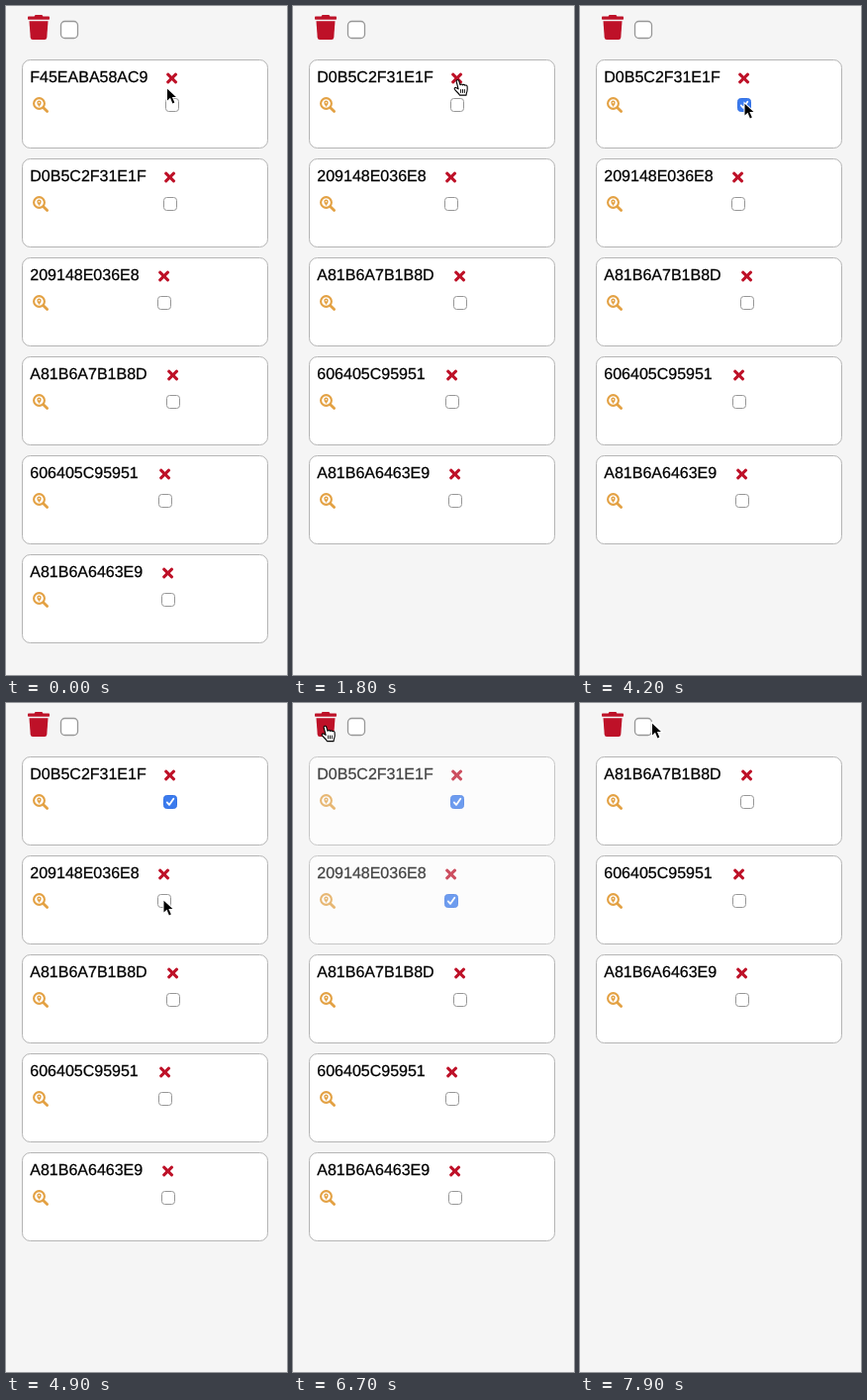
Write an HTML page that moves like this. It is 284 px wide and 676 px high and loops after 8000 ms.

```html
<!DOCTYPE html>
<html lang="en">
<head>
<meta charset="utf-8">
<title>Item list</title>
<style>
  html, body { margin: 0; width: 100%; height: 100%; overflow: hidden; background: #f5f5f5; }
  svg { display: block; }
  text { font: 16px "Liberation Sans", Arial, sans-serif; text-rendering: geometricPrecision; stroke: #000; stroke-width: .25; }
  .card { fill: #fff; stroke: #b5b5b5; }
  .box { fill: #fff; stroke: #979797; }
  .pressed .box { fill: #dcdcdc; stroke: #858585; }
  .checked .box { fill: #3b7bee; stroke: #3572e4; }
  .tick { fill: none; stroke: #fff; stroke-width: 1.8; stroke-linecap: round; stroke-linejoin: round; visibility: hidden; }
  .checked .tick { visibility: visible; }
  .red { fill: #be1128; }
</style>
</head>
<body>
<svg width="284" height="676" viewBox="0 0 284 676">
  <defs>
    <g id="lens" fill="none" stroke="#e3a143">
      <circle cx="6.5" cy="6.5" r="5.4" stroke-width="2.1"/>
      <path d="M11 11L14.6 14.6" stroke-width="2.8" stroke-linecap="round"/>
      <circle cx="6.5" cy="5.8" r="1.5" stroke-width="1.4"/>
      <path d="M4.6 7H8.4L6.5 10z" fill="#e3a143" stroke="none"/>
    </g>
    <g id="cross" class="red">
      <rect x="-6.9" y="-1.5" width="13.8" height="3" rx="1" transform="rotate(45)"/>
      <rect x="-6.9" y="-1.5" width="13.8" height="3" rx="1" transform="rotate(-45)"/>
    </g>
  </defs>
  <g class="red">
    <path d="M28.5 11L29.5 9H36.5L37.5 11z"/>
    <rect x="22" y="10.5" width="22" height="3.2" rx=".8"/>
    <path d="M23.5 15.2H42.5L41.3 31.8Q41.1 34 39 34H27Q24.9 34 24.7 31.8z"/>
  </g>
  <rect class="box" x="55.5" y="15.5" width="17" height="17" rx="4" stroke-width="1.3"/>
  <g id="list"></g>
  <path id="arrow" d="M1 2.2V14L4 11.2 6.4 16.9 8.3 16.1 5.9 10.6H9.9Z" stroke="#fff" stroke-width="2" paint-order="stroke"/>
  <g id="hand" fill="#fff" stroke="#000" stroke-width="1.1" stroke-linejoin="round" stroke-linecap="round">
    <path d="M5.1 10.4L3.2 3a1.3 1.3 0 0 1 2.5-.8L7 6.3c.3-1 2.2-1 2.4.1 .5-.9 2.2-.7 2.4.4 .6-.6 2.2-.3 2.3 1 .2 2 .3 3.4-.2 5 -.4 1.2-.8 2-.8 3.8H6.4c-.3-1.8-3.6-3.6-5-5.8 -.7-1.4.7-2.4 1.8-1.6z"/>
    <path d="M7.6 11v3M9.5 11v3M11.4 11v3" stroke-width=".9"/>
  </g>
</svg>
<script>
const LOOP = 8000, STEP = 100, PITCH = 100;

const items = [
  { label: 'F45EABA58AC9', x: 168, removed: 1500 },
  { label: 'D0B5C2F31E1F', x: 166, removed: 6700, pressed: 4000 },
  { label: '209148E036E8', x: 160, removed: 6700, pressed: 5100 },
  { label: 'A81B6A7B1B8D', x: 169 },
  { label: '606405C95951', x: 161 },
  { label: 'A81B6A6463E9', x: 164 }
];

// pointer moves: start time, end time, destination
const home = [162, 81.5];
const moves = [
  [0, 500, 161, 71],
  [1100, 1200, 162, 73.5],
  [2000, 2900, 165.5, 96.5],
  [4300, 4900, 158.5, 197.5],
  [5700, 6400, 28, 22],
  [7500, 7700, 72, 18.5]
];

const $ = id => document.getElementById(id);
const clamp = p => Math.min(1, Math.max(0, p));
const ease = p => p * p * (3 - 2 * p);

$('list').innerHTML = items.map(({ label, x }) => `<g>
  <rect class="card" x="16.5" y=".5" width="248" height="89" rx="8"/>
  <text x="24.3" y="23">${label}</text>
  <use href="#cross" x="${x - .4}" y="19"/>
  <use href="#lens" x="27" y="38"/>
  <g transform="translate(${x} 46)">
    <rect class="box" x="-6.5" y="-6.5" width="13" height="13" rx="3"/>
    <path class="tick" d="M-3.2 .4L-1 2.9 3.3 -3.2"/>
  </g></g>`).join('');
const cards = [...$('list').children];

function fade(age) {
  if (age < 0) return 1;
  return age < 300 ? .5 + .5 * Math.cos(Math.PI * (age + 140) / 400) : 0;
}

function pointerAt(t) {
  let [x, y] = home;
  for (const [start, end, toX, toY] of moves) {
    const p = ease(clamp((t - start) / (end - start)));
    x += (toX - x) * p;
    y += (toY - y) * p;
  }
  return [x, y];
}

function draw(t) {
  let slot = 0;
  items.forEach(({ removed = LOOP, pressed = LOOP }, i) => {
    const card = cards[i], alpha = fade(t - removed);
    card.style.display = alpha ? '' : 'none';
    if (!alpha) return;
    card.setAttribute('opacity', alpha);
    card.setAttribute('transform', `translate(0 ${54 + PITCH * slot++})`);
    card.setAttribute('class', t >= pressed + 200 ? 'checked' : t >= pressed ? 'pressed' : '');
  });

  const [x, y] = pointerAt(t);
  const overCross = x > 150 && y < 77, overBin = x < 46 && y < 34;
  const shown = overCross || overBin ? 'hand' : 'arrow';
  for (const id of ['arrow', 'hand']) {
    $(id).style.display = id === shown ? '' : 'none';
    $(id).setAttribute('transform', `translate(${x} ${y})`);
  }
}

const begin = performance.now();
function frame() {
  const t = (performance.now() - begin) % LOOP;
  draw(Math.floor(t / STEP) * STEP);
  requestAnimationFrame(frame);
}
frame();
</script>
</body>
</html>
```
